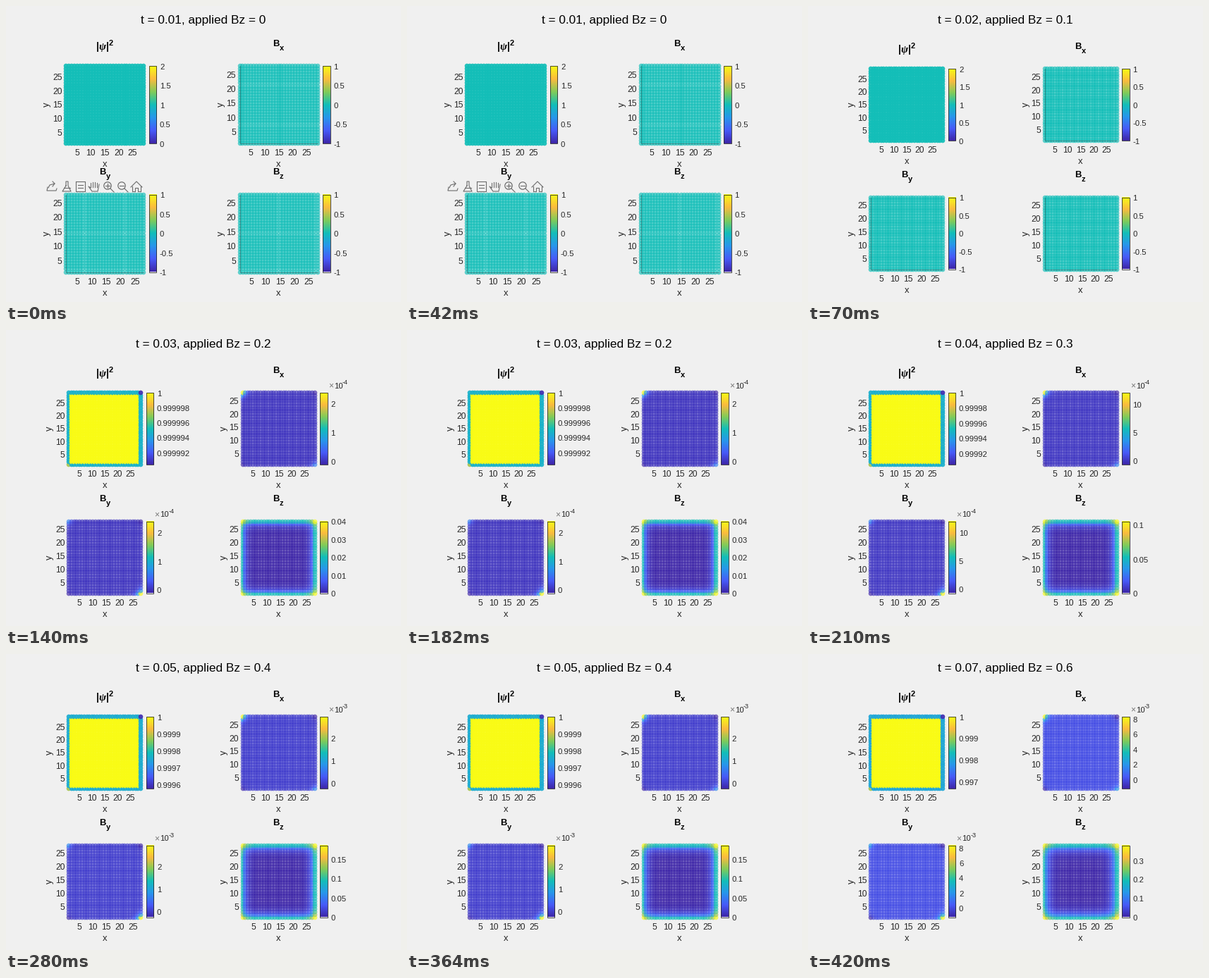
Write a matplotlib script that moves like this. It is 560x420 px and loops after 490 ms.

```python
import math

import numpy as np
import matplotlib.pyplot as plt
from matplotlib.animation import FuncAnimation
from matplotlib.colors import LinearSegmentedColormap
from matplotlib.patches import Circle, Rectangle

W, H, DPI = 560, 420, 100
PX = 72 / DPI  # points per pixel
INK, ICON = "#262626", "#6b6b6b"
STEPS = [1, 2, 3, 4, 5, 5, 7]

PARULA = LinearSegmentedColormap.from_list("parula", [
    (.2422, .1504, .6603), (.2780, .3556, .9777), (.1540, .5902, .9218),
    (.0704, .7457, .7258), (.5044, .7993, .3480), (.9871, .7348, .2438),
    (.9769, .9839, .0805)])

fig = plt.figure(figsize=(W / DPI, H / DPI), dpi=DPI, facecolor="#f0f0f0")
ax = fig.add_axes([0, 0, 1, 1])


def text(x, y, s, size, ha="center", color=INK, **kw):
    """Put text with the middle of its digits at y."""
    kw.setdefault("family", "Liberation Sans")
    ax.text(x, y + .36 * size, s, fontsize=size * PX, ha=ha, va="baseline",
            color=color, **kw)


# ---- data -----------------------------------------------------------------

def growth(start, power, bend, n):
    return start * n ** (power + bend * math.log(n))


def low_share(n):
    """Share of the in-plane field's range that lies below zero."""
    return .045 + .0033 * n * n


def limits(name, n):
    """Colour limits n steps after the field enters the sample."""
    if n < 1:
        return (0, 2) if name == "psi" else (-1, 1)
    if name == "psi":
        return 1 - growth(9.6e-6, 3.05, .36, n), 1
    if name == "z":
        return 0, growth(.04, 1.4, 0, n)
    span = growth(2.51e-4, 2.41, -.093, n)
    return -low_share(n) * span, (1 - low_share(n)) * span


def field(name, nx, ny, n):
    """Values on the grid as shares of the colour range, bottom row first."""
    x, y = np.arange(nx), np.arange(ny)[:, None]
    if n < 1:
        return np.full((ny, nx), .5)
    if name == "psi":
        at_edge = (x % (nx - 1) == 0) | (y % (ny - 1) == 0)
        v = np.where(at_edge, .46 - .012 * n, 1.0)
        v[-1, -1], v[0, 0] = .02, .72
        return v
    rate = .3 + .035 * n if name == "z" else .32
    left, right = rate ** x, rate ** (nx - 1 - x)
    low, top = rate ** y, rate ** (ny - 1 - y)
    if name == "z":
        return .5 * (left + right + low + top)
    base = low_share(n)
    strong, weak = top * left, low * right
    if name == "y":
        strong, weak = weak, strong
    return base + (1 - base) * strong + .22 * weak \
        - base * (top * right + low * left)


def tick_step(span):
    """Smallest 1-2-5 step that cuts the span into at most five parts."""
    power = 10 ** math.floor(math.log10(span / 5))
    return next(m * power for m in (1, 2, 5, 10) if span <= 5 * m * power)


# ---- panels ---------------------------------------------------------------

def dots(x0, y1, dx, dy, values, alpha):
    ny, nx = values.shape
    xs = np.floor(x0 + dx * np.arange(nx) + .5)
    ys = np.floor(y1 - dy * np.arange(ny) + .5)
    gx, gy = np.meshgrid(xs, ys, indexing="ij")
    ax.scatter(gx.ravel(), gy.ravel(), s=(6.6 * PX) ** 2,
               c=PARULA(np.clip(values.T.ravel(), 0, 1)),
               alpha=alpha, linewidths=0, zorder=3)


def color_bar(x, y0, y1, name, n):
    ramp = np.linspace(1, 0, 256)[:, None]
    ax.imshow(ramp, cmap=PARULA, vmin=0, vmax=1, extent=(x, x + 10.5, y1, y0),
              aspect="auto", zorder=2)
    ax.add_patch(Rectangle((x, y0), 10.5, y1 - y0, fill=False, ec=INK,
                           lw=.8 * PX, zorder=4))
    lo, hi = limits(name, n)
    step = tick_step(hi - lo)
    scale = 1
    if hi < .02:
        power = math.floor(math.log10(step) + 1e-9)
        scale = 10.0 ** power
        text(x + 12, y0 - 10.5, "×", 12, "left", color="#777777")
        text(x + 20, y0 - 10.5, "10", 11.3, "left")
        text(x + 32, y0 - 15, str(power), 9, "left")
    first = math.ceil(lo / step - 1e-6)
    last = math.floor(hi / step + 1e-6)
    for k in range(first, last + 1):
        y = y1 - (k * step - lo) / (hi - lo) * (y1 - y0)
        text(x + 15.5, y + .5, f"{round(k * step / scale, 9):g}", 11.3,
             "left")


def heading(name, x, y):
    bold = dict(ha="left", weight="bold", color="black")
    if name == "psi":
        text(x - 12.5, y + 5, "|", 14, **bold)
        text(x - 8.5, y + 4.5, "ψ", 15, family="Liberation Serif",
             style="italic", **bold)
        text(x + 2, y + 5, "|", 14, **bold)
        text(x + 6, y - .5, "2", 11, **bold)
    else:
        text(x - 8, y, "B", 13, **bold)
        text(x + 1.4, y + 6.5, name, 11, **bold)


def panel(name, cx, cy, nx, ny, step):
    size = 110 if step == 1 else 102
    n = step - 2
    x0, y0 = cx - size / 2, cy - size / 2
    x1, y1 = x0 + size, y0 + size
    dx, dy = size / (nx - 1), size / (ny - 1)
    ax.add_patch(Rectangle((x0, y0), size, size, fc="white", zorder=1))
    dots(x0, y1, dx, dy, field(name, nx, ny, n),
         .92 if name == "psi" else .66)
    if n < 1 and name != "psi":
        ax.plot([x0, x0, x1], [y0, y1, y1], color=INK, lw=.8 * PX,
                alpha=.45, zorder=4)

    for k in range(5, 26, 5):
        text(x0 + (k - 1) * dx, y1 + 13, str(k), 12)
        text(x0 - 5.5, y1 - (k - 1) * dy, str(k), 12, "right")
    text(cx, y1 + 28.7, "x", 13)
    ax.text(x0 - 27, cy, "y", fontsize=13 * PX, rotation=90, ha="center",
            va="center", color=INK, family="Liberation Sans")
    color_bar(x1 + 7.5, y0, y1, name, n)
    heading(name, cx, y0 - 32.7)


# ---- toolbar --------------------------------------------------------------

def stroke(*points):
    xs, ys = zip(*points)
    ax.plot(xs, ys, color=ICON, lw=1.1 * PX, zorder=5)


def lens(x, plus):
    ax.add_patch(Circle((x, 255), 5.2, fill=False, ec=ICON, lw=1.2 * PX,
                        zorder=5))
    stroke((x + 4, 259), (x + 9, 264))
    stroke((x - 3, 255), (x + 3, 255))
    if plus:
        stroke((x, 252), (x, 258))


def toolbar():
    # export
    stroke((59, 257), (58, 262), (71, 262), (72, 259))
    stroke((60, 258), (62, 254), (69, 252), (66, 249))
    stroke((69, 252), (66, 256))
    # brush
    stroke((85, 255), (85, 249), (88, 249), (88, 255), (92, 263), (80, 263),
           (85, 255))
    stroke((82, 258), (91, 258))
    # note
    stroke((99, 249), (112, 249), (112, 263), (99, 263), (99, 249))
    for y in (254, 258):
        stroke((102, y), (109, y))
    # hand
    for x in (120, 123, 126, 129):
        stroke((x, 257), (x, 249 + abs(x - 124.5) / 2))
    stroke((120, 258), (117, 256), (122, 263), (130, 263), (132, 253))
    lens(144, True)
    lens(164, False)
    # home
    stroke((177, 257), (185, 249), (193, 257))
    stroke((179, 256), (179, 263), (183, 263), (183, 258), (187, 258),
           (187, 263), (191, 263), (191, 256))


def draw(i):
    step = STEPS[i]
    ax.cla()
    ax.set_axis_off()
    text(279.5, 18.8, f"t = {step / 100:g}, applied Bz = {(step - 1) / 10:g}",
         17.2, color="black")
    panel("psi", 140, 140, 29, 29, step)
    panel("x", 386.5, 140, 29, 28, step)
    panel("y", 140, 322.5, 28, 28, step)
    panel("z", 386.5, 322.5, 28, 28, step)
    if step == 1:
        toolbar()
    ax.set_xlim(0, W)
    ax.set_ylim(H, 0)
    ax.set_aspect("auto")
    return []


anim = FuncAnimation(fig, draw, frames=len(STEPS), interval=70,
                     init_func=lambda: draw(0), repeat=True, repeat_delay=0)
plt.show()
```
